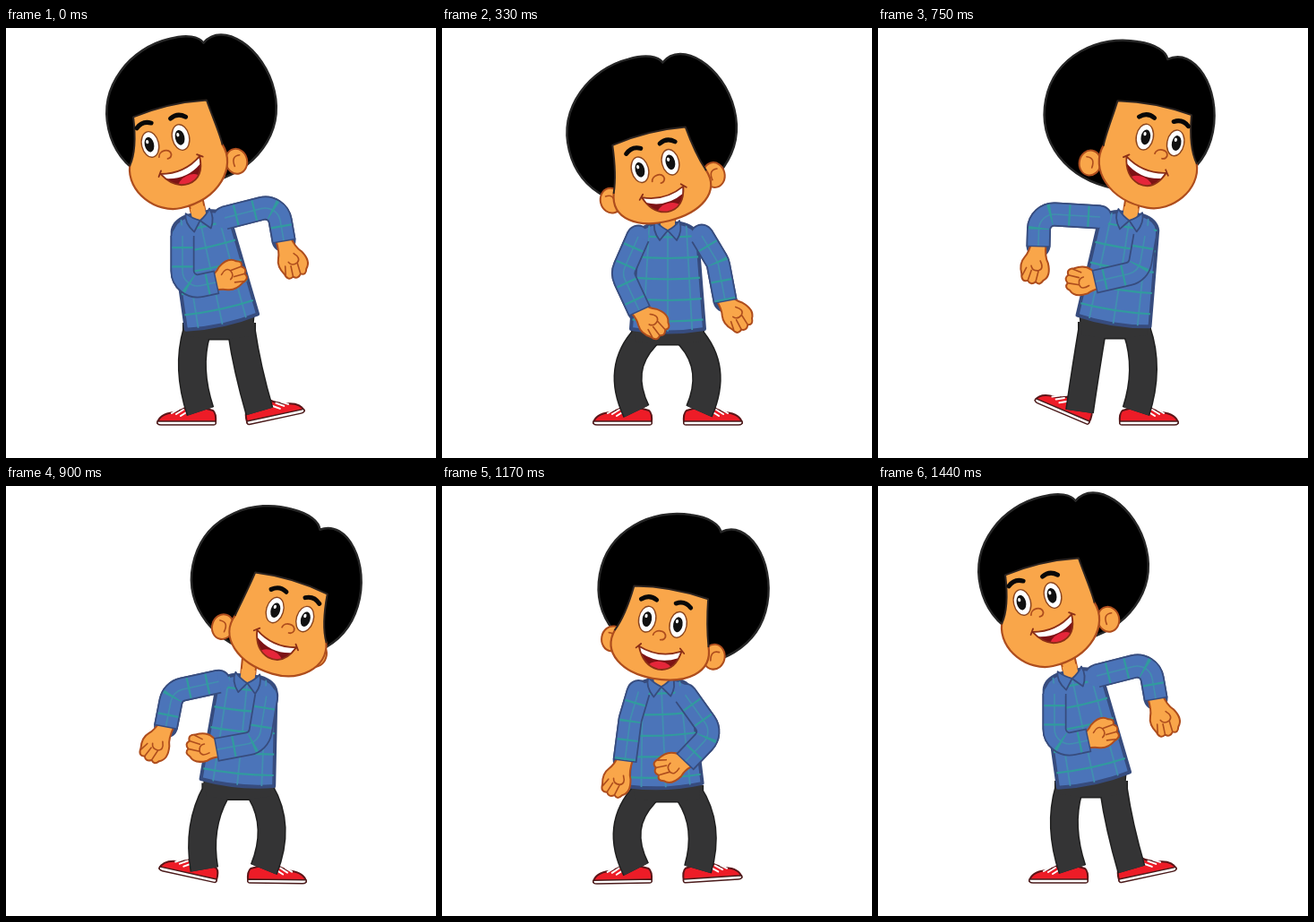
Recreate the animation shown at these times as an HTML page with a canvas. Size 480 by 480 pixels, loop 1470 ms.

```html
<!DOCTYPE html>
<html lang="en">
<head>
<meta charset="utf-8">
<style>
  html, body { margin: 0; height: 100%; overflow: hidden; background: #fff; }
  canvas { display: block; width: 100vw; height: 100vh; }
</style>
</head>
<body>
<canvas id="stage" width="480" height="480"></canvas>
<script>
const ctx = document.getElementById('stage').getContext('2d');
const LOOP = 1470, STEP = 30, CYCLE = 1440;
const SKIN = '#f9a64a', SKIN_EDGE = '#ae4d1d';
const SHIRT = '#4b74b9', SHIRT_EDGE = '#374c7e', TEAL = '#319b9e', TEAL_SOFT = '#418fb0';
const PANTS = '#343435', INK = '#202020';

const keyTimes = {
  6: [0, 330, 510, 750, 1050, 1290],
  8: [0, 120, 330, 510, 750, 870, 1050, 1290]
};

// Smooth periodic curve through one value per key time.
function track(...values) {
  const n = values.length, keys = keyTimes[n];
  const time = i => keys[(i + n) % n] + CYCLE * Math.floor(i / n);
  const value = i => values[(i + n) % n];
  const rate = i => (value(i + 1) - value(i)) / (time(i + 1) - time(i));
  const slope = i => {
    const before = time(i) - time(i - 1), after = time(i + 1) - time(i);
    return (rate(i - 1) * after + rate(i) * before) / (before + after);
  };
  return t => {
    const i = keys.filter(k => k <= t).length - 1;
    const span = time(i + 1) - time(i), u = (t - time(i)) / span, w = 1 - u;
    return value(i) * w * w * (1 + 2 * u) + value(i + 1) * u * u * (3 - 2 * u)
      + span * u * w * (slope(i) * w - slope(i + 1) * u);
  };
}
const point = (xs, ys) => {
  const x = track(...xs), y = track(...ys);
  return t => [x(t), y(t)];
};

const eyes = point([178, 177, 238, 275, 315, 322, 265, 227], [126, 131, 154, 137, 125, 140, 157, 140]);
const tilt = track(-13, -17, -14, 0, 11, 16, 16, 1);
const turn = track(-1, -.75, -.1, .6, 1, .75, .05, -.55);
const hairX = track(36, 30, 6, -24, -39, -30, 8, 21);
const hairY = track(-27, -31, -40, -25, -20, -28, -42, -34);
const neck = point([216, 252, 270, 281, 253, 235], [212, 223, 215, 212, 222, 218]);
const hem = point([241, 252, 258, 263, 252, 247], [328, 336, 331, 327, 335, 331]);
const hips = point([238, 252, 259, 264, 253, 248], [339, 345, 340, 338, 345, 342]);

const arms = [{
  shoulder: point([197, 219, 233, 248, 223, 214], [232, 233, 224, 211, 228, 230]),
  elbow: point([197, 201, 180, 180, 196, 217], [292, 274, 236, 207, 258, 265]),
  wrist: point([234, 220, 187, 179, 186, 223], [284, 315, 281, 243, 300, 302]),
  hand: point([249, 234, 197, 175, 172, 223], [277, 328, 303, 266, 319, 321])
}, {
  shoulder: point([244, 290, 290, 298, 279, 262], [212, 232, 233, 232, 236, 227]),
  elbow: point([303, 308, 290, 291, 280, 319], [197, 262, 268, 272, 291, 248]),
  wrist: point([310, 316, 275, 243, 244, 300], [237, 304, 308, 283, 307, 292]),
  hand: point([319, 328, 279, 229, 231, 287], [260, 320, 328, 282, 309, 304])
}];

const legs = [{
  side: -1, heel: 235, lift: track(0, 0, 12, 23, 0, 0),
  knee: track(208, 208, 226, 232, 208, 208), ankle: track(217, 217, 221, 225, 217, 217)
}, {
  side: 1, heel: 269, lift: track(12, 0, 0, 0, 0, 8),
  knee: track(271, 295, 296, 296, 295, 283), ankle: track(283, 287, 288, 288, 287, 284)
}];

function paint(path, fill, edge, width = 2) {
  path = new Path2D(path);
  if (fill) { ctx.fillStyle = fill; ctx.fill(path); }
  if (edge) { ctx.strokeStyle = edge; ctx.lineWidth = width; ctx.stroke(path); }
  return path;
}
function oval(x, y, rx, ry, fill, edge, width) {
  const path = new Path2D();
  path.ellipse(x, y, rx, ry, 0, 0, 7);
  paint(path, fill, edge, width);
}
function within(x, y, angle, draw) {
  ctx.save();
  ctx.translate(x, y);
  ctx.rotate(angle);
  draw();
  ctx.restore();
}

function drawShoe({ side, heel, lift }, t) {
  within(heel, 444, -side * lift(t) * Math.PI / 180, () => {
    ctx.scale(side, 1);
    paint('M1 -3Q0 -14 4 -17L29 -24Q38 -17 48 -15Q64 -13 66 -3Z', '#ed1c27', '#5c1518');
    paint('M1 -5L66 -5Q67 -1 62 -1L3 -1Q0 -1 1 -5Z', '#fff', '#4a1a1a', 1.5);
    paint('M32 -16L40 -11M37 -18L45 -13M43 -18L50 -14', null, '#fff', 2);
  });
}

function drawLegs(t) {
  const [x, y] = hips(t);
  legs.forEach(leg => drawShoe(leg, t));
  const limbs = legs.map(leg => {
    const hip = x + leg.side * 25, ankle = leg.ankle(t);
    const bend = 2 * leg.knee(t) - (hip + ankle) / 2;
    return `M${hip} ${y - 10}L${hip} ${y}Q${bend} 380 ${ankle} 428`;
  });
  const seat = `M${x - 38} ${y - 18}H${x + 38}L${x + 36} ${y + 5}L${x + 14} ${y + 8}H${x - 14}L${x - 36} ${y + 5}Z`;
  ctx.lineCap = 'butt';
  paint(seat, null, INK, 3);
  limbs.forEach(d => paint(d, null, INK, 32));
  limbs.forEach(d => paint(d, null, PANTS, 29));
  paint(seat, PANTS);
  ctx.lineCap = 'round';
}

function sleeve(arm, t, extra = 0) {
  const s = arm.shoulder(t), e = arm.elbow(t), w = arm.wrist(t);
  const len = Math.hypot(w[0] - e[0], w[1] - e[1]);
  const end = w.map((v, i) => v + (v - e[i]) / len * extra);
  const path = new Path2D();
  path.moveTo(...s);
  path.arcTo(...e, ...end, 17);
  path.lineTo(...end);
  return path;
}

function drawHand(arm, t) {
  const [wx, wy] = arm.wrist(t), [x, y] = arm.hand(t);
  const back = -Math.hypot(x - wx, y - wy) - 4;
  within(x, y, Math.atan2(y - wy, x - wx), () => {
    paint(`M${back} -8Q-12 -9 -6 -14Q8 -20 14 -12Q21 -9 17 -4Q22 1 17 5Q20 12 11 13Q0 18 -8 13Q-14 9 ${back} 8Z`,
      SKIN, SKIN_EDGE);
    paint('M16 -4L4 -5M17 5L5 3M12 12L3 9M-7 -5Q1 -11 4 -5Q6 2 0 4', null, SKIN_EDGE, 1.6);
  });
}

function drawArm(arm, t) {
  drawHand(arm, t);
  const path = sleeve(arm, t);
  ctx.lineCap = 'butt';
  paint(sleeve(arm, t, 1.5), null, SHIRT_EDGE, 27);
  oval(...arm.shoulder(t), 11.5, 11.5, SHIRT);
  paint(path, null, SHIRT, 23.5);
  paint(path, null, TEAL_SOFT, 1.6);
  ctx.setLineDash([2.2, 19]);
  ctx.lineDashOffset = -12;
  paint(path, null, TEAL, 23);
  ctx.setLineDash([]);
  ctx.lineCap = 'round';
}

function drawBody(t) {
  const [nx, ny] = neck(t), [hx, hy] = hem(t);
  const length = Math.hypot(hx - nx, hy - ny), lean = Math.atan2(nx - hx, hy - ny);
  const inBody = draw => within(nx, ny, lean, draw);
  const torso = `M-14 -5Q-30 -2 -33 9L-41 ${length}Q0 ${length + 7} 41 ${length}L33 9Q30 -2 14 -5Z`;

  arms.forEach(arm => paint(sleeve(arm, t), null, SHIRT_EDGE, 27));
  inBody(() => {
    paint('M-8 6V-24H8V6Z', SKIN, SKIN_EDGE);
    ctx.save();
    ctx.clip(paint(torso, SHIRT, SHIRT_EDGE, 4));
    for (let x = -24; x <= 24; x += 24) paint(`M${x * .85} -8L${x * 1.15} ${length + 8}`, null, TEAL_SOFT, 1.8);
    for (let y = 8; y < length; y += 23.5) paint(`M-45 ${y}Q0 ${y + 5} 45 ${y}`, null, TEAL, 2.2);
    ctx.restore();
    paint(torso, null, SHIRT_EDGE, 1.5);
  });
  arms.forEach(arm => drawArm(arm, t));
  inBody(() => {
    paint('M-8 -12H8V-2L0 4L-8 -2Z', SKIN);
    paint('M-14 -8Q-18 2 -9 14L0 3L10 14Q17 3 13 -8Q8 -1 0 3Q-8 -1 -14 -8Z', SHIRT, SHIRT_EDGE, 1.8);
  });
}

function drawEar(side, face) {
  const near = -side * face;
  const x = side * (60 + near * (near > 0 ? 12 : 30)), y = 24 + 16 * Math.abs(face);
  oval(x, y, 12, 14, SKIN, SKIN_EDGE);
  paint(`M${x + side * 5} ${y - 6}Q${x - side * 5} ${y - 7} ${x - side * 3} ${y + 5}`, null, SKIN_EDGE, 1.6);
}

function drawMouth(face) {
  within(-10 * face, 31, face * .2, () => {
    const lips = 'M-24 -1Q0 10 24 -1Q19 23 0 22Q-17 20 -24 -1Z';
    ctx.save();
    ctx.clip(paint(lips, '#7d1215'));
    oval(2, 22, 14, 9, '#e5263a');
    paint('M-24 -4Q0 8 24 -4L21 7Q0 17 -21 6Z', '#fff');
    ctx.restore();
    paint(lips + 'M-27 1L-22 -4M27 1L22 -4', null, '#8c2f16', 1.8);
  });
}

function drawHead(t) {
  const face = turn(t), chin = 63 + 14 * face * face;
  within(...eyes(t), tilt(t) * Math.PI / 180, () => {
    within(hairX(t), hairY(t), 0, () => paint(
      'M30 -70C56 -90 95 -50 95 0C95 48 55 83 0 83C-56 83 -95 48 -95 0C-95 -50 -50 -83 -6 -83C14 -84 27 -78 30 -70Z',
      '#000', '#272727', 2.5));
    drawEar(-1, face);
    drawEar(1, face);

    const left = -42 - 13 * face, right = 42 - 13 * face;
    const cheekL = -53 - 8 * face, cheekR = 53 - 8 * face;
    const hairline = `M${cheekL} 18C${left - 6} 5 ${left - 2} -15 ${left} -34`
      + `Q${-13 * face} -41 ${right} -34C${right + 2} -15 ${right + 6} 5 ${cheekR} 18`;
    const jaw = `C${cheekR + 10} 46 ${cheekR - 17} ${chin} 0 ${chin}C${cheekL + 17} ${chin} ${cheekL - 10} 46 ${cheekL} 18`;
    paint(hairline + jaw, SKIN);
    paint(`M${cheekR} 18${jaw}`, null, SKIN_EDGE, 2.2);
    paint(hairline, null, '#2b2320', 2);

    for (const side of [-1, 1]) {
      const x = side * 17.5;
      oval(x, 0, 9.5, 14.5, '#fff', '#8b451d', 1.4);
      oval(x + face, 0, 5.2, 8.5, '#111');
      oval(x + face - 1.5, -3.5, 1.6, 2.2, '#fff');
      paint(`M${side * 28} -21Q${side * 20} -28 ${side * 11} -23`, null, '#080808', 5);
    }
    const nose = 4 * face;
    paint(`M${nose - 7} 16C${nose - 6} 9 ${nose + 7} 8 ${nose + 7} 16Q${nose + 6} 20 ${nose + 2} 20`, null, SKIN_EDGE, 1.8);
    drawMouth(face);
  });
}

function render(now) {
  const t = Math.floor(now % LOOP / STEP) * STEP % CYCLE;
  ctx.fillStyle = '#fff';
  ctx.fillRect(0, 0, 480, 480);
  ctx.lineCap = ctx.lineJoin = 'round';
  drawLegs(t);
  drawBody(t);
  drawHead(t);
  requestAnimationFrame(render);
}
const start = performance.now();
requestAnimationFrame(function first() { render(0); });
</script>
</body>
</html>
```
